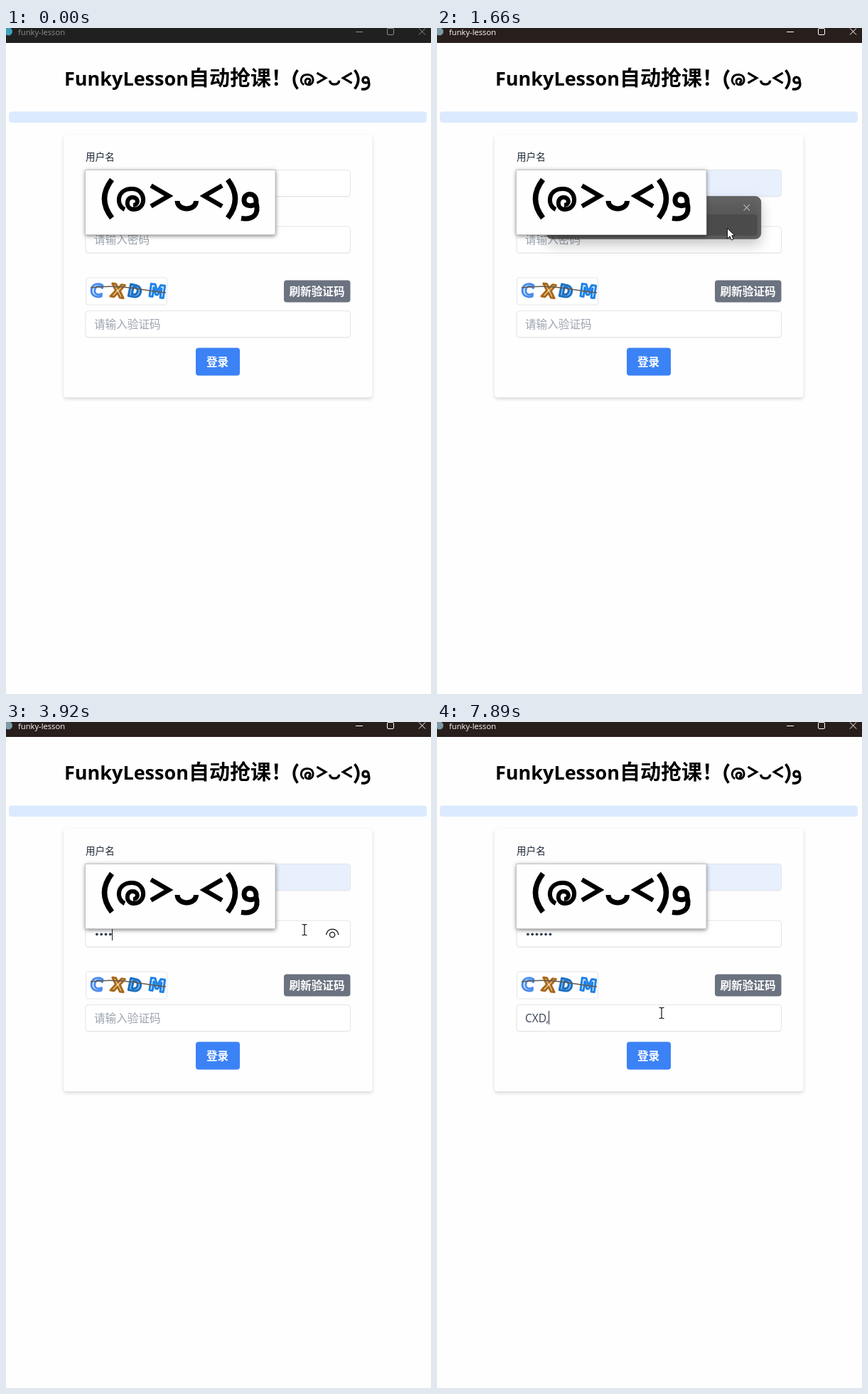
Animation of 598x936 px, one loop 8 s. Source, as an HTML page with a canvas:

```html
<!DOCTYPE html>
<html lang="zh-CN">
<head>
<meta charset="utf-8">
<title>funky-lesson</title>
<style>
html, body { margin: 0; width: 100%; height: 100%; overflow: hidden; background: #fefefe; }
canvas { display: block; }
</style>
</head>
<body>
<canvas id="stage" width="598" height="936"></canvas>
<script>
const ctx = document.getElementById('stage').getContext('2d');
const LOOP = 8000, BLINK = 530;
const LATIN = '"Open Sans", "Noto Sans", sans-serif';
const CJK = '"Noto Sans CJK SC", "Noto Sans CJK", sans-serif';

// Moments of typing: the first entry is the focus, each later one adds a character
const PASSWORD = [2270, 3330, 3460, 3660, 3920, 4320, 4600];
const CODE = [5750, 6690, 7420, 7760, 7890];
const CODE_TEXT = 'CXD,';

// Pointer path: time, x, y
const PATH = [
  [70, 458, 240], [330, 430, 217], [480, 428, 220], [810, 402, 297], [970, 402, 297],
  [1250, 405, 287], [1500, 408, 281], [1700, 408, 281], [1960, 414, 411],
  [2180, 420, 294], [2320, 420, 292], [5180, 420, 292], [5640, 316, 409]
];

const clamp = v => Math.max(0, Math.min(1, v));
const ease = v => v * v * (3 - 2 * v);
const ramp = (t, a, b) => ease(clamp((t - a) / (b - a)));

function text(str, x, y, size, color, family = CJK, weight = 400) {
  ctx.font = `${weight} ${size}px ${family}`;
  ctx.fillStyle = color;
  ctx.fillText(str, x, y);
}

function box(x, y, w, h, r, fill, stroke) {
  ctx.beginPath();
  ctx.roundRect(x, y, w, h, r);
  if (fill) { ctx.fillStyle = fill; ctx.fill(); }
  ctx.shadowColor = 'transparent';
  if (stroke) { ctx.strokeStyle = stroke; ctx.lineWidth = 1; ctx.stroke(); }
}

function shadow(alpha, blur, dy) {
  ctx.shadowColor = `rgba(0,0,0,${alpha})`;
  ctx.shadowBlur = blur;
  ctx.shadowOffsetY = dy;
}

function line(d, color, width) {
  ctx.strokeStyle = color;
  ctx.lineWidth = width;
  ctx.stroke(new Path2D(d));
}

// Face drawn around (135, 240) at full size
const FACE = [
  ['M149 213Q128 240 149 267', 7.5],
  ['M167 255C154 249 156 226 177 226C198 226 198 255 180 255C168 255 168 238 178 238C187 238 187 249 179 249', 6],
  ['M204 221.500L229 236L204 250.500', 6.5],
  ['M241 243C241 257.500 267.500 257.500 267.500 243', 7],
  ['M304 221.500L279 236L304 250.500', 6.5],
  ['M312 213Q333 240 312 267', 7.5],
  ['M352 244C352 230.500 335 230.500 335 242C335 252 349 251 352 246C356 261 349 270 331 267.500', 7]
];

function face(x, y, scale) {
  ctx.save();
  ctx.translate(x, y);
  ctx.scale(scale, scale);
  ctx.translate(-135, -240);
  for (const [d, w] of FACE) line(d, '#000', w);
  ctx.restore();
}

function titleBar(active) {
  const ink = active ? '#fff' : '#8e8e8e';
  ctx.fillStyle = active ? '#281e1c' : '#202020';
  ctx.fillRect(0, 0, 598, 21);
  ctx.beginPath();
  ctx.arc(3.5, 5, 5.5, 0, 7);
  ctx.fillStyle = active ? '#7f9ba5' : '#3f9fbe';
  ctx.fill();
  text('funky-lesson', 17, 10, 11.2, ink, LATIN);
  line('M492 5.500H502', ink, 1);
  box(536.5, .5, 9, 9, 1.5, null, ink);
  line('M581 .5L590 9.500M590 .5L581 9.500', ink, 1);
}

function field(y, fill = '#fff') {
  shadow(.07, 2, 1);
  box(112, y, 372.5, 37, 4, fill, '#e2e5e9');
}

function glyph(ch, x, y, size, angle, edge, fill) {
  ctx.save();
  ctx.translate(x, y);
  ctx.rotate(angle);
  ctx.font = `bold ${size}px "DejaVu Sans", sans-serif`;
  ctx.textAlign = 'center';
  ctx.textBaseline = 'middle';
  ctx.lineJoin = 'round';
  ctx.fillStyle = fill;
  ctx.fillText(ch, 0, 1);
  ctx.strokeStyle = edge;
  ctx.lineWidth = 3;
  ctx.strokeText(ch, 0, 1);
  ctx.restore();
}

function captcha() {
  box(112.5, 351, 114, 38, 3, '#fff', '#e2e5e9');
  glyph('C', 127.5, 370, 24, .12, '#4a8cec', '#eaf2fd');
  glyph('X', 157, 371, 25, .14, '#a9681a', '#f3dcb4');
  glyph('D', 181, 371, 23, .2, '#1c6fc0', '#8cc4f0');
  glyph('M', 212.5, 371, 24, .14, '#1f82e6', '#e0f0ff');
  line('M119 365Q150 361 182 366T225 372', '#65584a', 1.5);
}

const count = (times, t) => times.filter(v => t >= v).length - 1;

function caret(times, t, x, y) {
  const n = count(times, t);
  if (n < 0 || Math.floor((t - times[n]) / BLINK) % 2) return;
  ctx.fillStyle = '#222';
  ctx.fillRect(Math.round(x), y, 1, 19);
}

function password(t) {
  const n = count(PASSWORD, t), focused = t < CODE[0];
  if (n < 1) text('请输入密码', 124, 303, 15.6, '#9ca3af');
  for (let i = 0; i < n; i++) {
    ctx.beginPath();
    ctx.arc(127.9 + 6.3 * i, 298.3, 1.9, 0, 7);
    ctx.fillStyle = '#374151';
    ctx.fill();
  }
  if (!focused) return;
  caret(PASSWORD, t, 124 + 6.35 * Math.max(n, 0), 288);
  if (n > 0) {
    line('M450.500 299C453 288.500 465.500 288.500 468 299', '#111', 1.3);
    line('M455.500 299a3.600 3.600 0 1 0 7.200 0a3.600 3.600 0 1 0 -7.200 0', '#111', 1.3);
  }
}

function code(t) {
  const str = CODE_TEXT.slice(0, Math.max(0, count(CODE, t)));
  if (str) text(str, 124, 422, 15.5, '#374151', LATIN);
  else text('请输入验证码', 124, 422, 15.6, '#9ca3af');
  caret(CODE, t, 124 + (str ? ctx.measureText(str).width - .6 : 0), 406);
}

function dropdown(t) {
  const out = ramp(t, 1590, 1800);
  const alpha = ramp(t, 440, 640) * (1 - out);
  if (!alpha) return;
  ctx.save();
  const s = 1 - .03 * out;
  ctx.translate(304.5, 266.5);
  ctx.scale(s, s);
  ctx.translate(-304.5, -266.5);
  ctx.globalAlpha = alpha;
  shadow(.32, 18, 8);
  box(152.5, 236.5, 304.5, 60, 8, '#323232', '#4a4a4a');
  if (t > 1180) box(157, 262, 295, 30, 4, '#474747');
  line('M432.500 248L441 256.500M441 248L432.500 256.500', '#ddd', 1.1);
  ctx.restore();
}

function pointer(t) {
  if (t < PATH[0][0]) return;
  let i = 0;
  while (i < PATH.length - 2 && t >= PATH[i + 1][0]) i++;
  const [t0, x0, y0] = PATH[i], [t1, x1, y1] = PATH[i + 1];
  const k = ramp(t, t0, t1);
  const x = x0 + (x1 - x0) * k, y = y0 + (y1 - y0) * k;
  const menu = t > 480 && t < 1740;
  const beam = !menu && [199, 279, 397].some(top => y >= top && y <= top + 37);
  ctx.save();
  ctx.translate(x, y);
  if (beam) {
    line('M-3.500 -7.500H-1L0 -6.500L1 -7.500H3.500M0 -6.500V6.500M-3.500 7.500H-1L0 6.500L1 7.500H3.500', '#111', 1.2);
  } else {
    const arrow = new Path2D('M.5 .5V15L4 11.700L6.300 17L9 15.800L6.800 10.700H11Z');
    ctx.fillStyle = '#fff';
    ctx.fill(arrow);
    ctx.strokeStyle = '#111';
    ctx.lineWidth = 1;
    ctx.stroke(arrow);
  }
  ctx.restore();
}

function draw(t) {
  ctx.fillStyle = '#fefefe';
  ctx.fillRect(0, 0, 598, 936);
  titleBar(t >= 400);

  text('FunkyLesson', 82, 81, 27, '#000', LATIN, 700);
  text('自动抢课！', 257, 81, 29, '#000', CJK, 700);
  face(403.5, 72.3, .492);
  box(4, 117.5, 588, 15.5, 4, '#dbeafe');

  shadow(.15, 5, 2.5);
  box(81, 150, 434.5, 369, 4, '#fefefe');
  text('用户名', 112, 186, 13.6, '#1f2937', CJK, 500);
  field(199.5, t >= 1180 ? '#e8f0fe' : '#fff');
  field(279);
  field(397.5);
  password(t);
  captcha();
  box(391, 354.5, 93.5, 31, 4, '#6b7280');
  text('刷新验证码', 398.5, 376, 15.6, '#fff', CJK, 700);
  code(t);
  box(267, 449.5, 62, 39, 4, '#3b82f6');
  text('登录', 282, 475, 15.6, '#fff', CJK, 700);

  dropdown(t);
  shadow(.55, 6, 1);
  box(111.5, 199.5, 267.5, 91, 0, '#fefefe', '#c4c4c4');
  face(135, 240, 1);
  pointer(t);
}

const start = performance.now();
function tick() {
  draw((performance.now() - start) % LOOP);
  requestAnimationFrame(tick);
}
tick();
</script>
</body>
</html>
```
